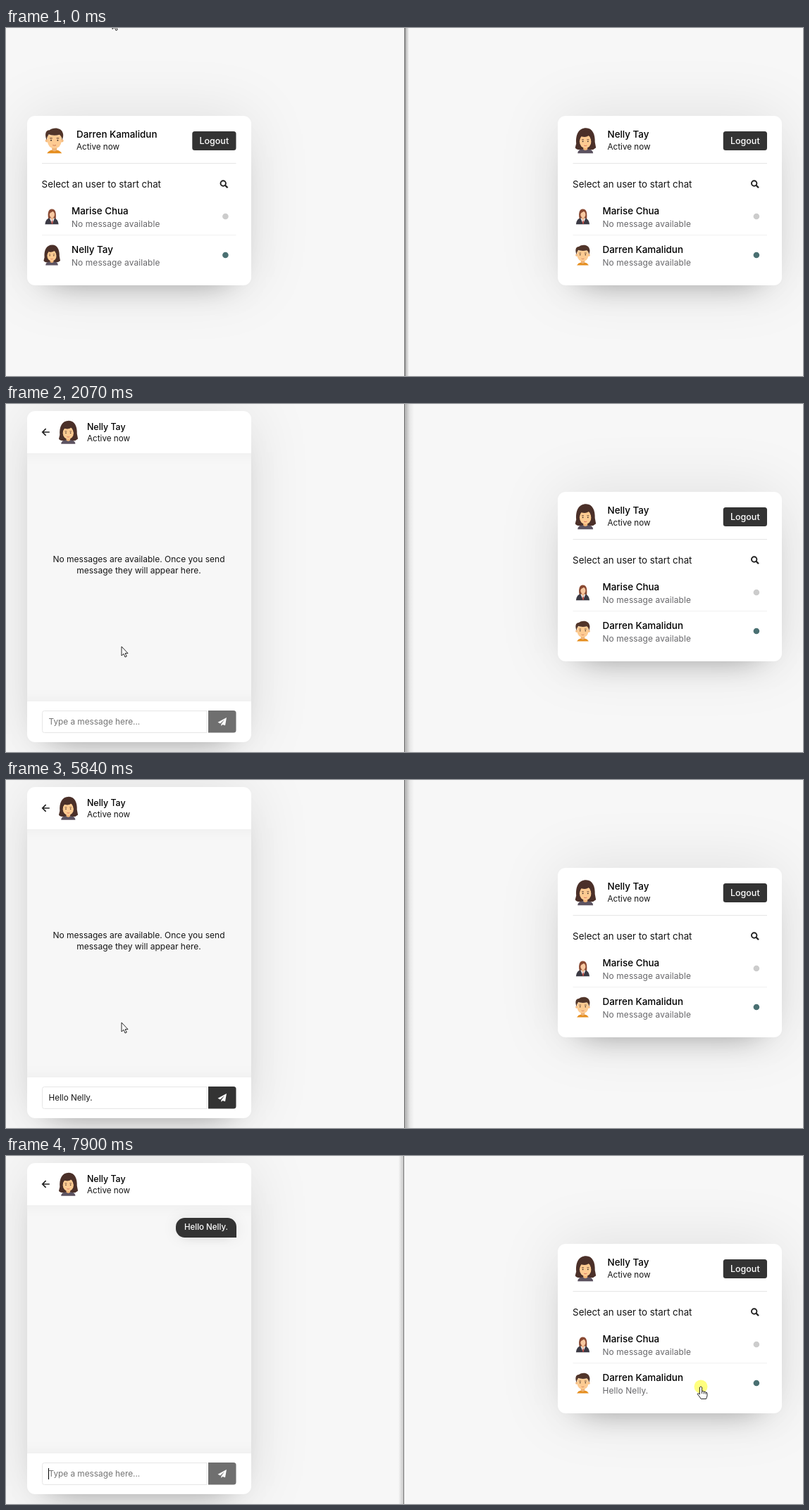
Animation of 1131 by 495 pixels, one loop 8000 ms. Source, as an HTML page:

```html
<!DOCTYPE html>
<html lang="en">
<head>
<meta charset="utf-8">
<title>Chat</title>
<style>
html, body { margin: 0; width: 100%; height: 100%; overflow: hidden; background: #f7f7f7; }
div, svg { position: absolute; }
svg { left: 0; top: 0; }
.card {
  width: 318px; border-radius: 11.3px; background: #fff; overflow: visible;
  box-shadow: 0 0 90px rgba(0,0,0,.1), 0 22.6px 45px -34px rgba(0,0,0,.5);
}
.list { top: 125px; height: 241px; }
#chatCard { left: 30px; top: 10px; height: 471px; }
#chatBox {
  top: 60px; width: 318px; height: 353px; background: #f7f7f7;
  box-shadow: inset 0 22.6px 22.6px -22.6px rgba(0,0,0,.05), inset 0 -22.6px 22.6px -22.6px rgba(0,0,0,.05);
}
#bubble {
  left: 211px; top: 78px; width: 86px; height: 28px; background: #333;
  border-radius: 12.7px 12.7px 0 12.7px;
  box-shadow: 0 0 22.6px rgba(0,0,0,.08), 0 11.3px 11.3px -11.3px rgba(0,0,0,.1);
}
#edge { left: 556px; top: 0; width: 24px; height: 495px; }
text { font-family: Inter, "Open Sans", sans-serif; font-size: 11.7px; fill: #141414; white-space: pre; }
.name { font-size: 13.4px; font-weight: 500; fill: #000; }
.head { font-size: 12.4px; font-weight: 500; fill: #000; }
.pick { font-size: 13.35px; }
.last { font-size: 11.9px; letter-spacing: .13px; fill: #67676a; }
.note { font-size: 12px; text-anchor: middle; }
.out { font-size: 12.5px; font-weight: 500; fill: #fff; text-anchor: middle; }
.sent { font-weight: 500; fill: #fff; text-anchor: middle; font-size: 11.5px; }
.hint { font-size: 11.8px; fill: #757575; }
</style>
</head>
<body>
<div class="card list" id="listCard" style="left:30px"></div>
<div class="card" id="chatCard"><div id="chatBox"></div><div id="bubble"></div></div>
<div class="card list" style="left:783px"></div>
<div id="edge"></div>

<svg width="1131" height="495">
  <defs>
    <g id="girl">
      <path fill="#4b3029" d="M-13 4C-14-8-10-18 1-18C10-18 14-9 13.5 2L15 10Q12 13 8 13H-8Q-13 13-14.5 10Z"/>
      <path fill="#5c5361" d="M-11 18Q-11 13-4 12H4Q11 13 11 18Z"/>
      <path fill="#eeb276" d="M-3 8H3V12.5Q0 15-3 12.5Z"/>
      <ellipse cy="1" rx="8.3" ry="9.8" fill="#fdcb92"/>
      <path fill="#4b3029" d="M-9.5 5Q-9-2-6-6Q2-4 5-8Q8-4 9 5Q13-9 3-14Q-13-13-9.5 5Z"/>
      <path stroke="#4b3029" d="M-5.2-1.5H-2.2M2.2-1.5H5.2" stroke-width=".8"/>
      <circle cx="-3.6" cy="1" r=".9" fill="#3b2a26"/><circle cx="3.6" cy="1" r=".9" fill="#3b2a26"/>
      <path stroke="#d9705e" fill="none" d="M-2 6.8Q0 8 2 6.8"/>
    </g>
    <g id="boy">
      <path fill="#e58e1f" d="M-10.5 18Q-8 14-4 13.5H4Q8 14 10.5 18Z"/>
      <path fill="#eeb276" d="M-3.5 8H3.5V13.5Q0 17-3.5 13.5Z"/>
      <circle cx="-10.6" cy="0" r="2.3" fill="#f5bb80"/><circle cx="10.6" cy="0" r="2.3" fill="#f5bb80"/>
      <path fill="#fdcb92" d="M-10-8H10V1Q9 10.5 0 11Q-9 10.5-10 1Z"/>
      <path fill="#51352a" d="M-11-1C-14-8-13-15-7-15C-1-20 10-18 11.5-12C13.5-8 12-4 11-1C10.5-5 9-7.5 7-8.5C2-7-5-7.5-8-9Q-10.5-6-11-1Z"/>
      <path stroke="#51352a" d="M-6.5-3.5H-3M3-3.5H6.5"/>
      <circle cx="-4.7" cy="-.5" r="1" fill="#3b2a26"/><circle cx="4.7" cy="-.5" r="1" fill="#3b2a26"/>
      <path stroke="#cf7757" fill="none" d="M-2.3 6.3Q0 7.6 2.3 6.3"/>
    </g>
    <g id="lady">
      <path fill="#8a4a33" d="M-6 5C-8-6-6-13 0-13C7-13 8-6 7 5Z"/>
      <path fill="#3b3a44" d="M-12 14Q-11 4-4 3H5Q11 5 12 14Z"/>
      <path fill="#f4f4f6" d="M-4 3L.5 13L5 3Z"/>
      <path fill="#eeb58a" d="M-2 0H3V4L.5 7L-2 4Z"/>
      <ellipse cx=".5" cy="-3.5" rx="4.4" ry="5.5" fill="#f8c8a0"/>
      <path fill="#8a4a33" d="M-5-3Q-3-7 2-9Q5-7 6-3Q7-12 0-12Q-6-11-5-3Z"/>
      <path fill="#c0483f" d="M0 7H1.4L2 12L.7 14L-.6 12Z"/>
    </g>
  </defs>
  <g id="leftList"></g>
  <g id="chat">
    <path d="M52 40H61.8M56.6 35.2L51.8 40L56.6 44.8" fill="none" stroke="#222" stroke-width="1.7"/>
    <use href="#girl" transform="translate(88.3 40.3) scale(.92)"/>
    <text class="head" x="115" y="37">Nelly Tay</text>
    <text x="115" y="53">Active now</text>
    <g id="empty">
      <text class="note" x="188.5" y="224.5">No messages are available. Once you send</text>
      <text class="note" x="188.5" y="241">message they will appear here.</text>
    </g>
    <text id="sent" class="sent" x="284" y="105.3">Hello Nelly.</text>
    <path d="M285 436.5H54.5Q51.5 436.5 51.5 439.5V464.5Q51.5 467.5 54.5 467.5H285Z" fill="#fff" stroke="#e6e6e6"/>
    <text id="hint" class="hint" x="60.5" y="456">Type a message here...</text>
    <text id="typed" x="60.5" y="456"></text>
    <rect id="caret" y="444" width="1" height="16"/>
    <g id="send">
      <path d="M287 436H323Q326.5 436 326.5 439.5V464Q326.5 467.5 323 467.5H287Z" fill="#333"/>
      <path d="M313 446L300.5 452.8L304 454.4L310.4 448.8L305.4 455.2V458L307.4 455.9L311 457.3Z" fill="#fff"/>
    </g>
  </g>
  <g id="rightList"></g>
  <g id="mouse">
    <circle id="click" r="9.5" fill="#ff0" opacity=".5"/>
    <path id="arrow" d="M0 0V13L3 10.3L5 15L7.2 14L5.1 9.6H9Z" fill="#fff" stroke="#111" stroke-width=".9"/>
    <path id="hand" d="M-1.6 11V1Q0-1.2 1.6 1V6.6Q3.4 5.6 4.4 7.2Q6.2 6.4 7 8.2Q9 7.8 9 9.8V13Q8.6 15 7.6 17.5H.2Q-1.8 14-4.7 10.8Q-4.4 8.4-1.6 11ZM1.6 6.6V10M4.4 7.2V10.4M7 8.2V10.8" fill="#fff" stroke="#111" stroke-width=".9"/>
  </g>
</svg>

<script>
const $ = id => document.getElementById(id);
const boy = ['Darren Kamalidun', 'boy'], girl = ['Nelly Tay', 'girl'], lady = ['Marise Chua', 'lady'];
const none = 'No message available', message = 'Hello Nelly.';

const face = (id, x, y, s) => `<use href="#${id}" transform="translate(${x} ${y}) scale(${s})"/>`;

const row = ([name, id], y, dot) => `
  ${face(id, 65, y, .8)}
  <text class="name" x="93" y="${y - 3}">${name}</text>
  <text class="last" x="93" y="${y + 14.5}">${none}</text>
  <circle cx="311.4" cy="${y}" r="4.3" fill="${dot}"/>`;

function fillList(id, x, me, friend) {
  $(id).setAttribute('transform', `translate(${x})`);
  $(id).innerHTML = `
    ${face(me[1], 68.7, 160.3, 1)}
    <text class="name" x="100" y="156.3">${me[0]}</text>
    <text x="100" y="173.3">Active now</text>
    <rect x="264.3" y="147" width="62.2" height="27" rx="3.5" fill="#333"/>
    <text class="out" x="295.3" y="164.7">Logout</text>
    <path d="M51 192.5H326.5" stroke="#e6e6e6"/>
    <text class="pick" x="50.6" y="227">Select an user to start chat</text>
    <g fill="none" stroke="#222"><circle cx="308.2" cy="221" r="3.7" stroke-width="1.9"/>
    <path d="M311 223.8L314.5 227.3" stroke-width="2.3"/></g>
    ${row(lady, 268, '#ccc')}
    <path d="M51 294.5H326.5" stroke="#f1f1f1"/>
    ${row(friend, 323, '#4a7072')}`;
}
fillList('leftList', 0, boy, girl);
fillList('rightList', 753.5, girl, boy);
const news = $('rightList').querySelectorAll('.last')[1];

// Each entry: start time, then its values, held until the next entry
const path = [
  [0, 151, -11.5], [440, 156, 50], [590, 164, 165], [750, 163, 275, 1], [900, 155, 317, 1],
  [1500, 155, 317], [1790, 158, 328], [1930, 162, 339], [2070, 164, 345],
  [6850, 225, 352], [7000, 450, 350], [7150, 725, 345], [7300, 920, 337, 1],
  [7450, 995, 330, 1], [7600, 986, 328, 1]
];
const keys = [[0, 0], [2680, 1], [2990, 2], [3140, 3], [3300, 4], [3620, 5], [3740, 6], [4180, 7],
  [4630, 8], [4910, 9], [5250, 11], [5390, 12], [6120, 0]];
const blink = [[0, 0], [1500, 1], [2070, 0], [2520, 1], [5840, 0], [6120, 1], [6850, 0], [7300, 1]];
const edges = [
  [0, 'transparent 9px, #888 9px 10px, #888 10px 11px, #0004 11px, transparent 16px'],
  [1190, 'transparent 9px, #666 9px 10px, #bbb 10px 11px, #0004 11px, #0001 17px, transparent 23px'],
  [7900, 'transparent 1px, #0003 8px, #777 8px 9px, #fafafa 9px 10px, transparent 10px']
];

const held = (list, t) => list.findLast(k => k[0] <= t);
const show = (id, on) => $(id).style.display = on ? '' : 'none';
const ramp = (t, start) => Math.min(1, Math.max(0, (t - start) / 300));

function draw(t) {
  const chatting = t >= 1500, sent = t >= 6280;
  show('listCard', !chatting);
  show('leftList', !chatting);
  show('chatCard', chatting);
  show('chat', chatting);
  show('empty', t >= 1930 && !sent);
  show('bubble', sent);
  show('sent', sent);

  const text = message.slice(0, held(keys, t)[1]);
  $('typed').textContent = text;
  show('hint', !text);
  show('caret', held(blink, t)[1]);
  const width = text && chatting ? $('typed').getComputedTextLength() : 0;
  $('caret').setAttribute('x', Math.round(60 + width));
  $('send').style.opacity = .7 + .3 * (ramp(t, 2680) - ramp(t, 6120));

  news.textContent = t >= 6430 ? message : none;
  $('edge').style.background = `linear-gradient(90deg, ${held(edges, t)[1]})`;

  const [, x, y, hand] = held(path, t);
  $('mouse').setAttribute('transform', `translate(${x} ${y})`);
  show('hand', hand);
  show('arrow', !hand);
  show('click', t >= 1190 && t < 1350 || t >= 7900);
}

const start = performance.now();
function tick() {
  draw((performance.now() - start) % 8000);
  requestAnimationFrame(tick);
}
tick();
</script>
</body>
</html>
```
